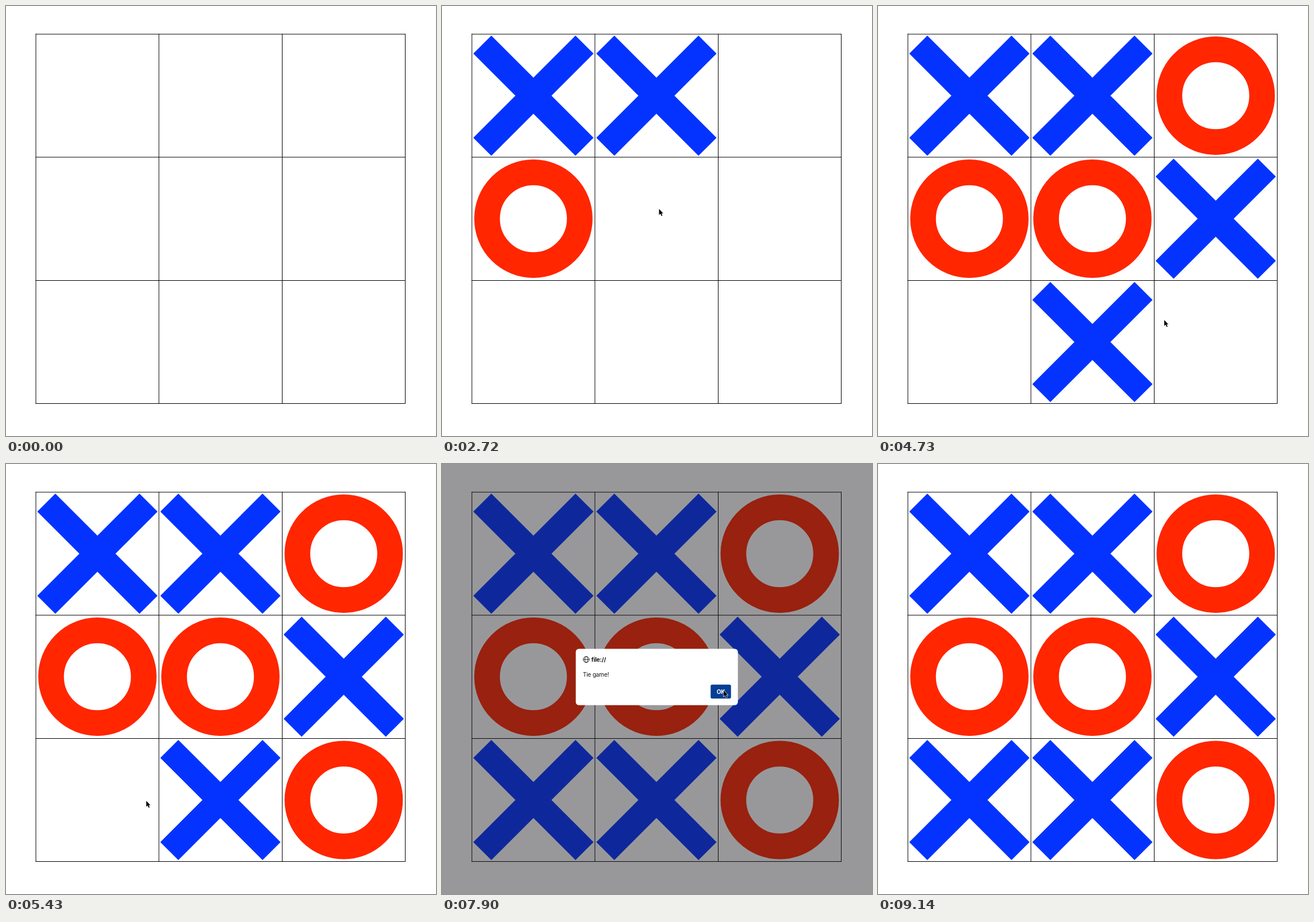
Animation, 748 px wide and 748 px high, one loop 9.5 s. Source, as an HTML page:

```html
<!DOCTYPE html>
<html lang="en">
<head>
<meta charset="utf-8">
<title>Tic-tac-toe</title>
<style>
  html, body { margin: 0; width: 100%; height: 100%; overflow: hidden; background: #fff; }
  svg { display: block; width: 100%; height: 100%; }
  text { font: 10.1px Inter, "Open Sans", sans-serif; letter-spacing: -.2px; fill: #15141a; }
  .bold { font-weight: 700; }
</style>
</head>
<body>
<svg viewBox="0 0 748 748">
  <defs>
    <path id="X" d="M-88.9-88.9L88.9 88.9M88.9-88.9L-88.9 88.9" stroke="#0433ff" stroke-width="44.4"/>
    <circle id="O" r="80.6" fill="none" stroke="#ff2600" stroke-width="44.6"/>
  </defs>
  <rect width="748" height="748" fill="#fff"/>
  <path id="grid" fill="none" stroke="#000" stroke-linecap="square"/>
  <g id="marks"></g>
  <g id="dialog">
    <rect width="748" height="748" fill="#1c1b22" fill-opacity=".45"/>
    <rect x="232.7" y="321.5" width="282" height="98" rx="5.5" fill="#fff"/>
    <g fill="none" stroke="#15141a" stroke-width=".9">
      <circle cx="250.9" cy="340.1" r="5.2"/>
      <ellipse cx="250.9" cy="340.1" rx="2.4" ry="5.2"/>
      <path d="M245.7 340.1h10.4"/>
    </g>
    <text class="bold" x="259.8" y="343.6">file://</text>
    <text x="245" y="369.8">Tie game!</text>
    <rect id="button" x="467.3" y="383.7" width="35.4" height="24.3" rx="2.8"/>
    <text class="bold" x="485" y="399.6" text-anchor="middle" style="fill:#fff">OK</text>
  </g>
  <path id="cursor" d="M0 0V10.4L2.4 8.2L4.2 12.2L5.9 11.4L4.2 7.6H7.2Z" stroke="#fff" stroke-width="1.2" paint-order="stroke"/>
</svg>
<script>
const LOOP = 9500, STEP = 87.9, LEAD = 18;   // ms; the pointer is sampled once per STEP
const LEFT = 52, TOP = 49, CELL = 214.3;
const ENTER = 5, PRESS = 90, CLOSE = 92, EXIT = 104;   // steps
const $ = id => document.getElementById(id);

// Pointer stops: arrival step, steps of travel, x, y
const clicks = [
  [15, 10, 131, 128], [22, 6, 165, 336], [27, 4, 349, 168],
  [32, 4, 378, 356], [37, 4, 546, 350], [41, 3, 550, 177],
  [48, 5, 384, 534], [57, 4, 581, 555], [63, 5, 221, 588]
];
const stops = [
  [ENTER, 1, 685, 314], ...clicks,
  [75, 8, 507, 328], [79, 4, 497, 390], [86, 6, 490, 394],
  [100, 5, 697, 709], [EXIT, 3, 760, 758]
];

const snap = v => Math.floor(v * 2) / 2;
const lineAt = (origin, i) => snap(origin + i * CELL);
const centre = (origin, v) => snap(origin + 107 + Math.floor((v - origin) / CELL) * CELL);
const easeOut = u => 1 - (1 - u) ** 3;
const show = (el, on) => el.setAttribute('visibility', on ? 'visible' : 'hidden');

const right = lineAt(LEFT, 3), bottom = lineAt(TOP, 3);
$('grid').setAttribute('d', [0, 1, 2, 3].map(i =>
  `M${lineAt(LEFT, i)} ${TOP}V${bottom}M${LEFT} ${lineAt(TOP, i)}H${right}`).join(''));

// Each click marks the cell under the pointer, X and O in turn
$('marks').innerHTML = clicks.map(([, , x, y], i) =>
  `<use href="#${'XO'[i % 2]}" x="${centre(LEFT, x)}" y="${centre(TOP, y)}"/>`).join('');
const marks = [...$('marks').children];
const clickStep = clicks.map(([arrive]) => arrive + 1);
const OPEN = clickStep.at(-1);

function pointer(step) {
  let [, , x, y] = stops[0];
  for (const [arrive, travel, toX, toY] of stops) {
    const u = easeOut(Math.min(1, Math.max(0, 1 - (arrive - step) / travel)));
    x += (toX - x) * u;
    y += (toY - y) * u;
  }
  return [x, y];
}

function buttonColor(step, [x, y]) {
  if (step >= PRESS) return '#053e94';
  const over = Math.abs(x - 485) < 18 && Math.abs(y - 396) < 12;
  return over ? '#0250bb' : '#0061e0';
}

function draw(t) {
  const step = Math.floor((t + LEAD) / STEP), tip = pointer(step);
  marks.forEach((mark, i) => show(mark, step >= clickStep[i]));
  show($('dialog'), step >= OPEN && step < CLOSE);
  $('button').setAttribute('fill', buttonColor(step, tip));
  show($('cursor'), step >= ENTER && step < EXIT);
  $('cursor').setAttribute('transform', `translate(${tip})`);
}

const start = performance.now();
function tick() {
  draw((performance.now() - start) % LOOP);
  requestAnimationFrame(tick);
}
tick();
</script>
</body>
</html>
```
